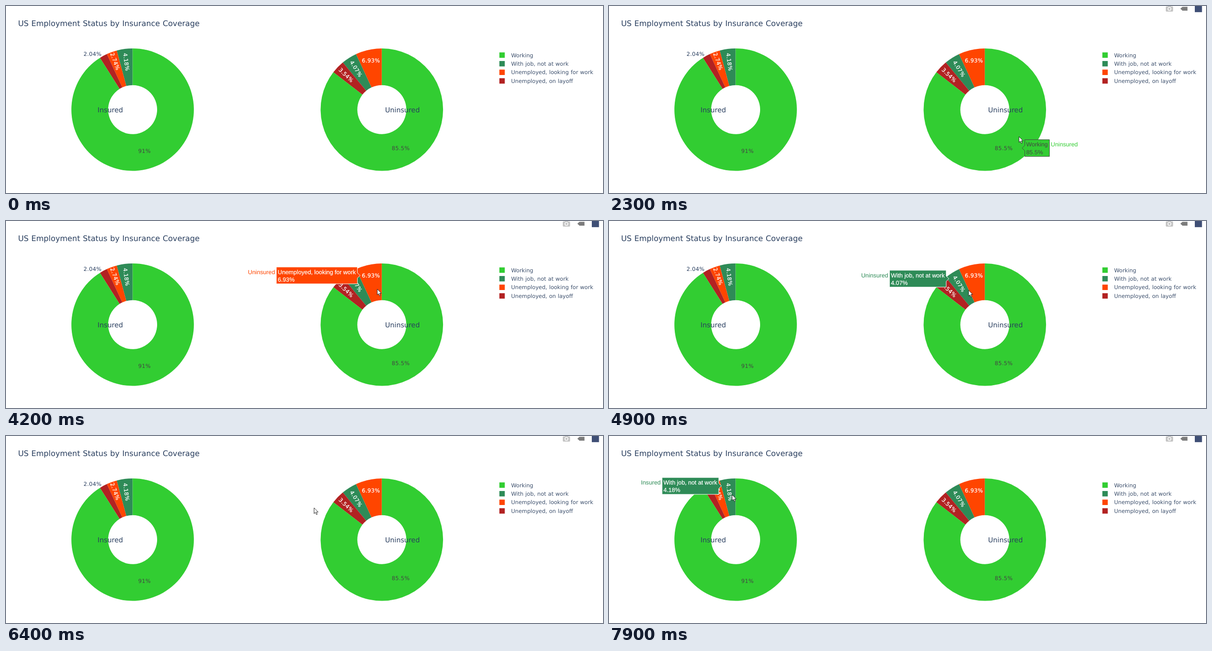
Recreate the animation shown at these times as an HTML page. Size 1280 px wide and 401 px high, loop 8 s.

```html
<!DOCTYPE html>
<html lang="en">
<head>
<meta charset="utf-8">
<title>Employment status donuts</title>
<style>
  html, body { margin: 0; width: 100%; height: 100%; overflow: hidden; background: #fff; }
  svg { display: block; width: 1280px; height: 401px; }
  text {
    font: 11.65px "DejaVu Sans", sans-serif; fill: #2a3f5f; word-spacing: .035em;
    white-space: pre; text-rendering: geometricPrecision;
  }
  .mid { text-anchor: middle; }
  .pct { letter-spacing: .03em; }
  .title { font-size: 16.5px; }
  .name { font-size: 14.7px; }
  .key { fill: #3c4f6c; }
  .tip text { font: 12.7px "Liberation Sans", Arial, sans-serif; word-spacing: 0; }
  .light, .tip .light { fill: #fff; stroke: #fff; stroke-width: .25px; }
</style>
</head>
<body>
<svg id="stage" viewBox="0 0 1280 401">
  <g id="chart"></g>
  <g id="bar" opacity="0">
    <path fill="#c4c4c4" d="M1195.5 1H1198L1199.2 -1H1204L1205.2 1H1207.7Q1209.4 1 1209.4 2.7V10.3Q1209.4 12 1207.7 12H1195.5Q1193.8 12 1193.8 10.3V2.7Q1193.8 1 1195.5 1Z"/>
    <circle cx="1201.6" cy="6.3" r="3.2" fill="#c4c4c4" stroke="#fff" stroke-width="1.5"/>
    <path fill="#7c7c7c" d="M1225 5.8L1229.5 1.7H1240.3V10H1229.5Z"/>
    <rect x="1256" y="-2" width="15.4" height="15.2" fill="#3f4f75"/>
  </g>
  <g id="tips"></g>
  <path id="cursor" fill="#fff" stroke="#111" stroke-width=".9" visibility="hidden"
    d="M0 0V12.4L2.8 9.8L5 14.6L7 13.7L4.9 9.1H8.8Z"/>
</svg>
<script>
const $ = id => document.getElementById(id);
const GREEN = '#32cd32', SEA = '#2e8b57', ORANGE = '#ff4500', BRICK = '#b22222', DARK = '#444';
const LABELS = {
  [GREEN]: 'Working',
  [SEA]: 'With job, not at work',
  [ORANGE]: 'Unemployed, looking for work',
  [BRICK]: 'Unemployed, on layoff'
};
const CY = 222.2, R = 131.3, HOLE = R * 0.4, RAD = Math.PI / 180;

// Slices run counterclockwise from the top: colour, share, label, radius of a radial label
const pies = [
  { name: 'Insured', cx: 271.5, nameX: 223.5, slices: [
    [SEA, 4.18, '4.18%', 103], [ORANGE, 2.74, '2.74%', 110], [BRICK, 2.04, '2.04%'], [GREEN, 91.04, '91%']] },
  { name: 'Uninsured', cx: 805.8, nameX: 850, slices: [
    [ORANGE, 6.93, '6.93%'], [SEA, 4.07, '4.07%', 103.5], [BRICK, 3.54, '3.54%', 106.5], [GREEN, 85.46, '85.5%']] }
];

function add(parent, tag, attrs, text) {
  const el = document.createElementNS('http://www.w3.org/2000/svg', tag);
  for (const k in attrs) el.setAttribute(k, attrs[k]);
  if (text) el.textContent = text;
  parent.append(el);
  return el;
}
const chart = $('chart');
const label = (x, y, text, cls, extra = {}) =>
  add(chart, 'text', { x, y, class: cls, ...extra }, text);

function polar(cx, a, r) {
  return [cx - r * Math.sin(a * RAD), CY - r * Math.cos(a * RAD)];
}

function ring(cx, a0, a1) {
  const big = a1 - a0 > 180 ? 1 : 0;
  return `M${polar(cx, a0, R)}A${R} ${R} 0 ${big} 0 ${polar(cx, a1, R)}` +
    `L${polar(cx, a1, HOLE)}A${HOLE} ${HOLE} 0 ${big} 1 ${polar(cx, a0, HOLE)}Z`;
}

function makeTip(x, y, dir, color, lines, name) {
  const g = add($('tips'), 'g', { class: 'tip', transform: `translate(${x} ${y})`, visibility: 'hidden' });
  const dark = color === GREEN;
  const box = add(g, 'path', { fill: color, stroke: dark ? DARK : '#fff' });
  const ink = dark ? { style: `fill:${DARK}` } : { class: 'light' };
  const rows = lines.map((s, i) => add(g, 'text', { y: -3.2 + i * 16.5, ...ink }, s));
  const w = Math.max(...rows.map(r => r.getComputedTextLength())) + 6.5;
  const near = 5.8 * dir, far = near + w * dir;
  box.setAttribute('d', `M0 0L${near} 5.8V18H${far}V-18H${near}V-5.8Z`);
  rows.forEach(r => r.setAttribute('x', Math.min(near, far) + 3));
  add(g, 'text', { x: far + 3 * dir, y: -3.2, style: `fill:${color};text-anchor:${dir > 0 ? 'start' : 'end'}` }, name);
  return g;
}

const zones = [];
for (const { name, cx, nameX, slices } of pies) {
  let a = 0;
  for (const [color, share, text, radial] of slices) {
    const a0 = a, a1 = a = Math.min(360, a + share * 3.6), mid = (a0 + a1) / 2;
    add(chart, 'path', { d: ring(cx, a0, a1), fill: color });
    // largest circle that fits in the slice
    const s = Math.sin(Math.min(90, (a1 - a0) / 2) * RAD);
    const fit = Math.min(s / (1 + s), 0.3);
    const [x, y] = polar(cx, mid, R * (1 - fit));
    if (radial) {
      const [tx, ty] = polar(cx, mid, radial);
      label(0, 4.2, text, 'mid pct light', { transform: `translate(${tx} ${ty}) rotate(${90 - mid})` });
    } else if (color === BRICK) {
      label(185.5, 106.7, text, 'mid pct');
    } else if (color === GREEN) {
      label(x, y + 4.6, text, 'mid pct', { style: `fill:${DARK}` });
    } else {
      label(x, y + 4.6, text, 'mid pct light');
    }
    const dir = color === GREEN ? 1 : -1;
    zones.push({ cx, a0, a1, tip: makeTip(x + dir * fit * R, y, dir, color, [LABELS[color], text], name) });
  }
  label(nameX, 228.2, name, 'name mid');
}

label(26, 42.5, 'US Employment Status by Insurance Coverage', 'title');
Object.entries(LABELS).forEach(([color, text], i) => {
  const y = 105.3 + i * 18.45;
  add(chart, 'rect', { x: 1057.8, y: y - 5.8, width: 11.6, height: 11.6, fill: color });
  label(1083, y + 4.2, text, 'key');
});

// Pointer path: time, x, y
const path = [
  [200, 985, 399], [1000, 950, 375], [1100, 946, 370], [1900, 889, 292], [2300, 879, 280],
  [2500, 879, 280], [2800, 860, 312], [3100, 836, 290], [3400, 868, 225], [4200, 796, 146],
  [4300, 796, 146], [4800, 774, 148], [5200, 762, 150], [5300, 740, 149], [5500, 738, 150],
  [5600, 738, 150], [5800, 708, 153], [5900, 700, 150], [6000, 694, 146], [6100, 689, 142],
  [6300, 689, 142], [6400, 660.5, 154], [7200, 316, 176], [7900, 264, 126]
];

function pointer(t) {
  const i = path.findIndex(p => p[0] > t);
  if (i < 0) return path[path.length - 1].slice(1);
  const [t0, x0, y0] = path[i - 1], [t1, x1, y1] = path[i];
  const k = (t - t0) / (t1 - t0);
  return [x0 + (x1 - x0) * k, y0 + (y1 - y0) * k];
}

function hits({ cx, a0, a1 }, x, y) {
  const dx = cx - x, dy = CY - y, r = Math.hypot(dx, dy);
  const a = (Math.atan2(dx, dy) / RAD + 360) % 360;
  return r > HOLE && r < R && a >= a0 && a < a1;
}

const show = (el, on) => el.setAttribute('visibility', on ? 'visible' : 'hidden');

function draw() {
  const t = Math.floor(performance.now() % 8000 / 100) * 100;
  const on = t >= 200;
  const [x, y] = on ? pointer(t) : [0, 0];
  $('bar').setAttribute('opacity', Math.max(0, Math.min(1, (t - 100) / 300)));
  $('cursor').setAttribute('transform', `translate(${x} ${y})`);
  show($('cursor'), on);
  for (const z of zones) show(z.tip, on && hits(z, x, y));
  requestAnimationFrame(draw);
}
draw();
</script>
</body>
</html>
```
